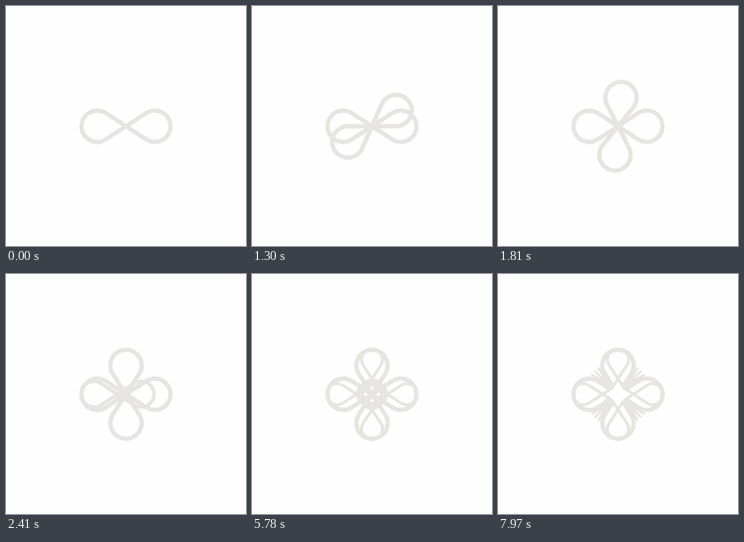
These frames come from a looping animation (300 by 300 pixels, 8 s). An HTML page with a canvas:

```html
<!DOCTYPE html>
<html>
<head>
<meta charset="utf-8">
<style>
html, body { margin: 0; width: 100%; height: 100%; overflow: hidden; background: #fefefe; }
canvas { display: block; }
</style>
</head>
<body>
<canvas id="stage" width="300" height="300"></canvas>
<script>
const ctx = document.getElementById('stage').getContext('2d');
const INK = '#e6e5e2', PAPER = '#fefefe';
const LOOP = 8000, STEP = 30;
const R = 19.6, D = 36;              // loop radius, loop centre distance
const TILT = Math.asin(R / D);       // slope of the crossing lines
const TIP = D + R + 2.7;             // outer end including the stroke
const SMALL = 0.67;
const stepsSince = (t, start) => Math.floor((t - start) / STEP) + 1;
const clamp = (v, lo, hi) => Math.max(lo, Math.min(hi, v));

// Teardrop pointing along +x; tail prolongs its lines past the crossing.
function drop(tail = 0) {
  const x = tail * Math.cos(TILT), y = tail * Math.sin(TILT), a = Math.PI / 2 + TILT;
  ctx.beginPath();
  ctx.moveTo(-x, y);
  ctx.arc(D, 0, R, -a, a);
  ctx.lineTo(-x, -y);
  ctx.stroke();
}

function turned(deg, draw) {
  ctx.save();
  ctx.rotate(-deg * Math.PI / 180);
  draw();
  ctx.restore();
}

function infinity(deg) {
  turned(deg, () => drop());
  turned(deg + 180, () => drop());
}

// Scaled figure whose outer end stays on the tip of the petal.
function nested(deg, scale, draw) {
  turned(deg, () => {
    ctx.translate(TIP * (1 - scale), 0);
    ctx.scale(scale, scale);
    draw();
  });
}

function star() {
  ctx.fillStyle = PAPER;
  ctx.beginPath();
  for (let i = 0; i < 8; i++) {
    const a = i * Math.PI / 4, r = i % 2 ? 9 : 19;
    ctx.lineTo(r * Math.cos(a), r * Math.sin(a));
  }
  ctx.fill();
}

function wisps(t) {
  ctx.lineWidth = 2.6;
  [[32.5, 24.5], [28.5, 28.5], [24.5, 32.5]].forEach(([x, y], i) => {
    const p = clamp((t - 7310 - i * 220) / 220, 0, 1);
    if (!p) return;
    for (const sx of [-1, 1]) for (const sy of [-1, 1]) {
      ctx.beginPath();
      ctx.moveTo(sx * 12, sy * 12);
      ctx.lineTo(sx * (12 + (x - 12) * p), sy * (12 + (y - 12) * p));
      ctx.stroke();
    }
  });
}

function draw(t) {
  ctx.setTransform(1, 0, 0, 1, 0, 0);
  ctx.fillStyle = PAPER;
  ctx.fillRect(0, 0, 300, 300);
  ctx.translate(150, 150.3);
  ctx.strokeStyle = INK;
  ctx.lineWidth = 5.4;
  ctx.lineCap = 'round';
  ctx.lineJoin = 'round';

  infinity(0);
  if (t >= 1000) infinity(Math.min(90, 3 * stepsSince(t, 1000)));

  if (t < 6490) {
    if (t >= 1900) {
      const scale = Math.max(SMALL, 1 - stepsSince(t, 1900) / 100);
      nested(180, scale, () => infinity(0));
    }
    [[0, 3160], [90, 3610], [270, 4120]].forEach(([deg, start]) => {
      if (t >= start) nested(deg, SMALL, () => infinity(0));
    });
  } else {
    star();
    for (let deg = 0; deg < 360; deg += 90) nested(deg, SMALL, () => drop(16));
    if (t < 7310) {
      ctx.fillStyle = '#f0efed';
      for (const x of [-3, 2]) for (const y of [-3, 2]) ctx.fillRect(x, y, 1, 1);
    }
    wisps(t);
  }
}

const begin = performance.now();
function tick() {
  draw((performance.now() - begin) % LOOP);
  requestAnimationFrame(tick);
}
tick();
</script>
</body>
</html>
```
